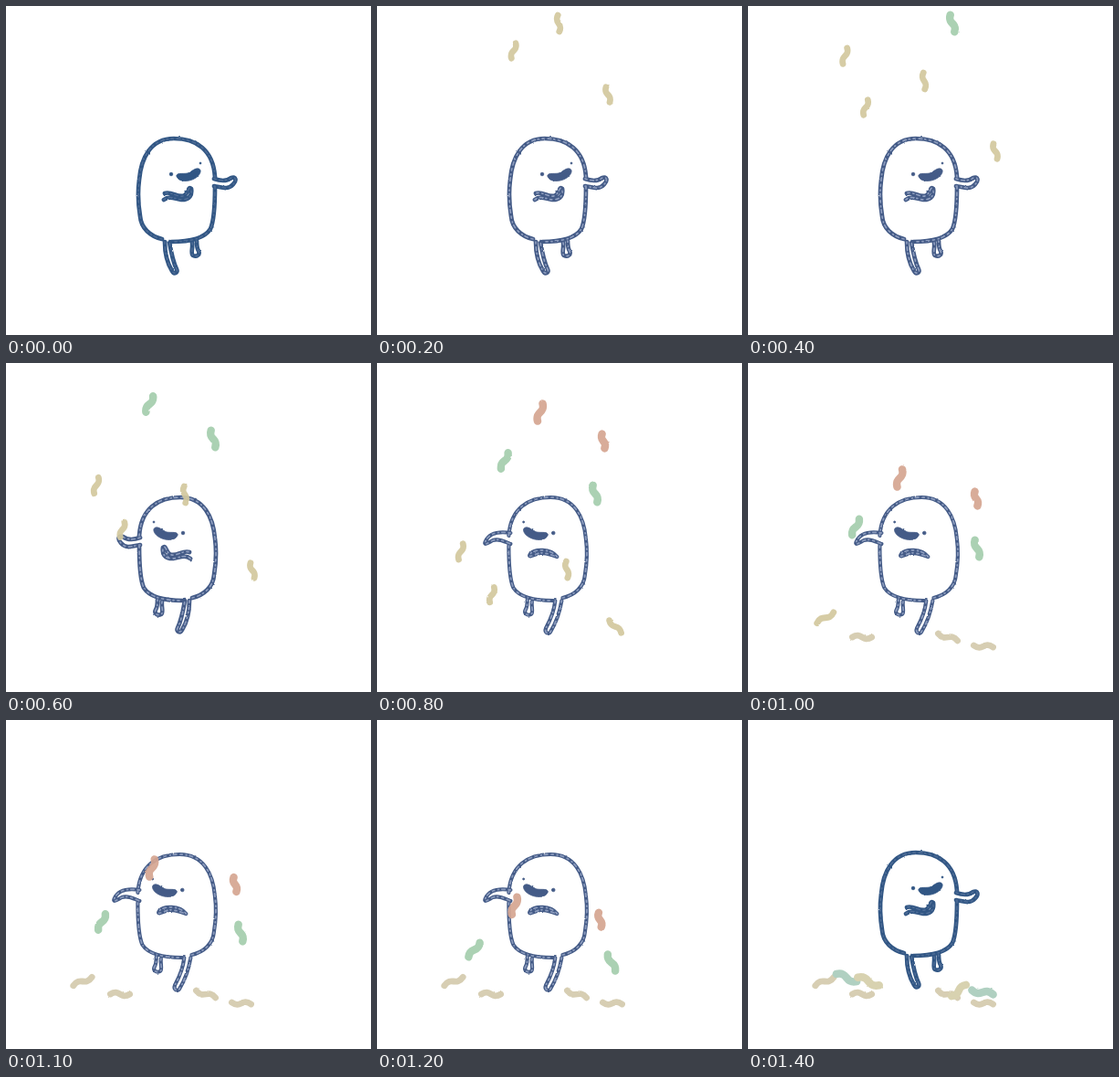
An HTML page for the animation above (1500 ms loop, 400x360 px).

```html
<!DOCTYPE html>
<html lang="en">
<head>
<meta charset="utf-8">
<title>Confetti dance</title>
<style>
  html, body { margin: 0; width: 100%; height: 100%; overflow: hidden; background: #fff; }
  svg { display: block; width: 100vw; height: 100vh; }
  path { stroke-linecap: round; stroke-linejoin: round; }
  #ink, #grain { fill: none; }
</style>
</head>
<body>
<svg viewBox="0 0 400 360">
  <defs>
    <filter id="rough" filterUnits="userSpaceOnUse" x="0" y="0" width="400" height="360" color-interpolation-filters="sRGB">
      <feTurbulence type="fractalNoise" baseFrequency=".2" numOctaves="2" seed="4"/>
      <feDisplacementMap in="SourceGraphic" scale="1.8" xChannelSelector="R" yChannelSelector="G"/>
    </filter>
  </defs>
  <g filter="url(#rough)">
    <g id="body">
      <path id="ink"/>
      <path id="grain" stroke="#9aa9c8" stroke-width="1.7" stroke-dasharray="2 4 3.5 3 1 4"/>
      <g id="face" stroke-width=".8">
        <path d="M187 186C187 182 193 184 199 183C204 181 207 177 211 178C215 179 213 185 208 188C201 193 188 193 187 186Z"/>
        <circle cx="181" cy="184" r="1.8"/>
        <circle cx="213" cy="172" r="1"/>
      </g>
    </g>
    <g id="confetti" fill="none" opacity=".93"></g>
  </g>
</svg>
<script>
const LOOP = 1500, STEP = 100;
const $ = id => document.getElementById(id);

// Figure facing right; the other poses are mirrored.
const torso = 'M171 255C158 252 148 243 147 230C145 218 144 205 146 190C148 167 158 145 184 145C208 145 227 157 229 187' +
  'M229 198C229 215 228 235 224 244C217 255 200 258 181 258';
const foot = 'M204 259C205 265 202 271 205 273C209 275 213 272 211 268C209 265 209 261 209 257';
const leg = 'M174 258C174 269 177 282 182 290C184 294 189 292 187 288C183 280 181 270 179 258';
const wideLeg = 'M172 258C174 270 178 282 184 292C186 296 191 293 189 288C183 277 180 268 179 258';
const armsUp = 'M228 189C236 192 243 191 247 188C252 186 253 191 249 195C243 202 236 198 228 197' +
  'M173 212C179 207 185 211 192 212C202 212 204 206 203 200C200 197 200 203 196 207C189 211 181 202 174 205';
const armsDown = 'M227 184C240 182 250 184 254 193C257 199 250 194 246 192C240 190 234 193 227 196' +
  'M177 210C184 201 201 201 206 207C209 212 202 208 196 206C190 205 184 208 177 210';

const poses = {
  right: { d: torso + foot + leg + armsUp, move: '' },
  left: { d: torso + foot + leg + armsUp, move: 'translate(375 2) scale(-1 1)' },
  droop: { d: torso + foot + wideLeg + armsDown, move: 'translate(377.5 2) scale(-1.018 1)' }
};

function poseAt(n) {
  if (n < 6 || n > 12) return poses.right;
  return n < 8 ? poses.left : poses.droop;
}

const hues = {
  tan: { width: 6.8, air: '#d3c99f', floor: '#d4cbae' },
  green: { width: 8.5, air: '#a5ceae', floor: '#aacdbd' },
  orange: { width: 8.5, air: '#d6a692', floor: '#d5cfaa' }
};

// lean and lie are angles from vertical in degrees; path holds [step, x, y].
const pieces = [
  { hue: 'tan', size: 9, lean: 5, lie: 70, path: [[2, 199, 19], [4, 193, 82], [6, 196, 144], [9.8, 219, 300]] },
  { hue: 'tan', size: 8.5, lean: -16, lie: -90, path: [[1, 160, 18], [4, 129, 111], [9.3, 125, 300]] },
  { hue: 'tan', size: 8.5, lean: 14, lie: 85, path: [[1, 244, 66], [4, 271, 159], [6, 270, 227], [8.7, 258, 310]] },
  { hue: 'tan', size: 9, lean: -15, lie: -65, path: [[3, 110, 15], [6, 99, 134], [10.2, 84, 286]] },
  { hue: 'green', size: 9.5, lean: 14, lie: 78, path: [[4, 224, 19], [6, 227, 83], [11, 257, 233], [13, 257, 298]] },
  { hue: 'green', size: 9.5, lean: -24, lie: -110, path: [[5, 166, 14], [9, 131, 138], [11, 105, 221], [13, 108, 282]] },
  { hue: 'orange', size: 10, lean: -16, lie: -110, path: [[7, 185, 18], [11, 160, 162], [14, 132, 286]] },
  { hue: 'orange', size: 8, lean: 10, lie: -52, path: [[7, 247, 54], [11, 251, 180], [14, 231, 296]] }
];

for (const p of pieces) {
  p.el = document.createElementNS('http://www.w3.org/2000/svg', 'path');
  $('confetti').append(p.el);
}

const mix = (a, b, t) => a + (b - a) * t;

function position(path, n) {
  const i = path.findIndex(k => k[0] >= n);
  if (i < 0) return path[path.length - 1];
  if (i === 0) return path[0];
  const a = path[i - 1], b = path[i];
  return a.map((v, j) => mix(v, b[j], (n - a[0]) / (b[0] - a[0])));
}

function drawPiece(p, n) {
  const shown = n >= p.path[0][0];
  p.el.style.display = shown ? '' : 'none';
  if (!shown) return;
  const [, x, y] = position(p.path, n);
  const land = p.path[p.path.length - 1][0];
  const down = Math.min(1, Math.max(0, (n - land + 1.2) / 1.2));
  const angle = mix(p.lean, p.lie, down) * Math.PI / 180;
  const half = p.size * mix(1, 1.25, down);
  const dx = half * Math.sin(angle), dy = half * Math.cos(angle);
  const bend = p.lean > 0 ? -.6 : .6;
  const bx = dy * bend, by = -dx * bend;
  const hue = hues[p.hue];
  p.el.setAttribute('d', `M${x - dx} ${y - dy}C${x + bx} ${y + by} ${x - bx} ${y - by} ${x + dx} ${y + dy}`);
  p.el.setAttribute('stroke', down < 1 ? hue.air : hue.floor);
  p.el.setAttribute('stroke-width', hue.width);
}

function draw(ms) {
  const n = Math.floor(ms % LOOP / STEP);
  const pose = poseAt(n);
  const solid = n < 1 || n > 12;
  const tone = solid ? '#315684' : '#445b87';
  $('body').setAttribute('transform', pose.move);
  $('ink').setAttribute('d', pose.d);
  $('ink').setAttribute('stroke', tone);
  $('ink').setAttribute('stroke-width', pose === poses.droop ? 4.1 : 4.7);
  $('grain').setAttribute('d', pose.d);
  $('grain').setAttribute('opacity', solid ? .25 : .85);
  $('face').setAttribute('fill', tone);
  $('face').setAttribute('stroke', tone);
  pieces.forEach(p => drawPiece(p, n));
}

const start = performance.now();
function tick() {
  draw(performance.now() - start);
  requestAnimationFrame(tick);
}
tick();
</script>
</body>
</html>
```
